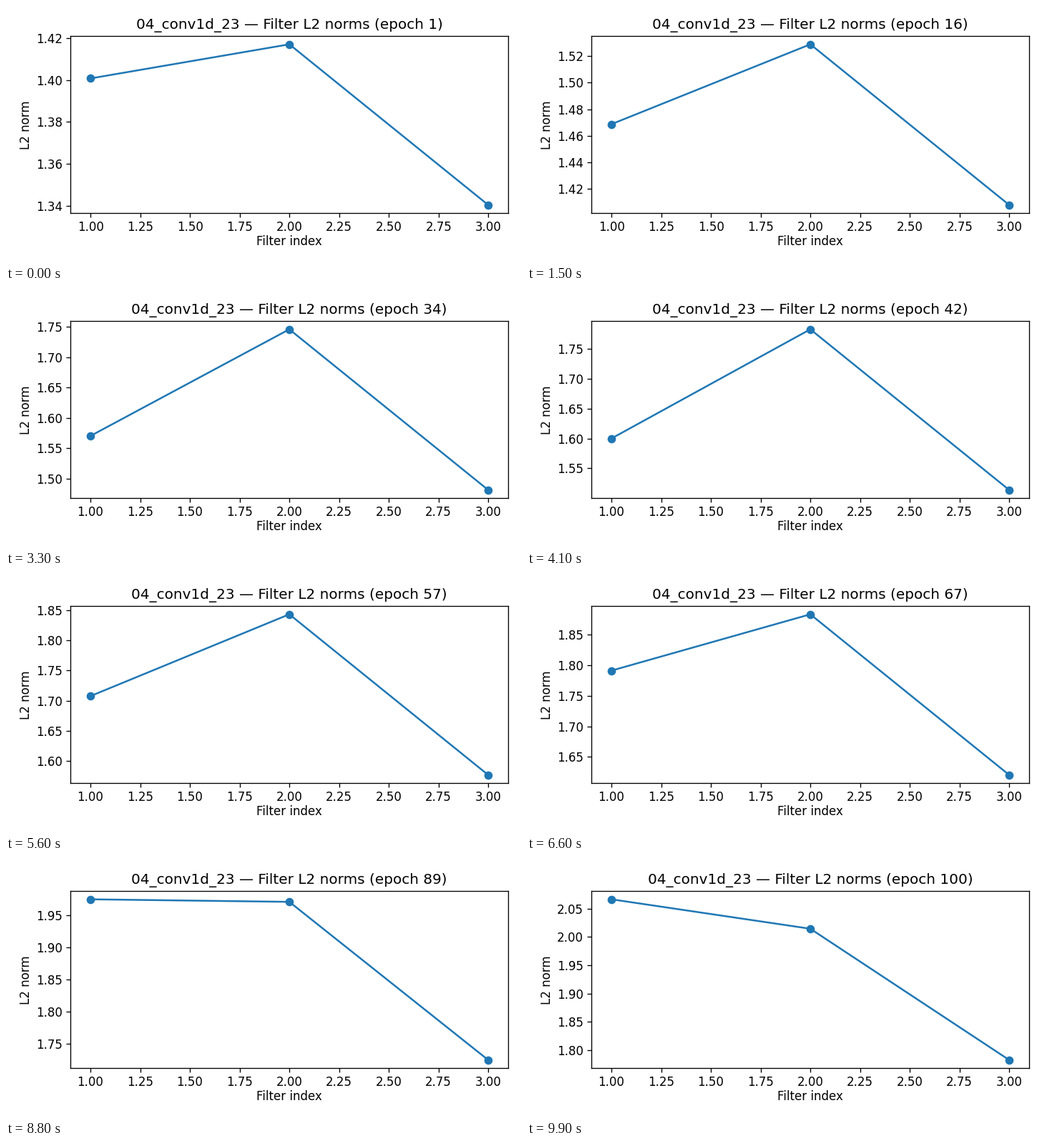
Recreate the animation shown at these times as a matplotlib script. Size 720x360 px, loop 10000 ms.

```python
import numpy as np
import matplotlib.pyplot as plt
from matplotlib.animation import FuncAnimation

W, H = 720, 360
EPOCHS = 100
FILTERS = [1, 2, 3]


def surge(s, center, steepness):
    """Logistic step from 0 to 1."""
    return 1 / (1 + np.exp(-steepness * (s - center)))


def norms_at(epoch):
    """Steady growth of each filter plus its own spurts."""
    s = (epoch - 1) / (EPOCHS - 1)
    late = max(0, s - 0.4525)
    first = 1.4008 + 0.37 * s + 0.046 * surge(s, 0.175, 45) + 0.456 * late
    second = 1.4155 + 0.394 * s + 0.205 * surge(s, 0.193, 25)
    third = (1.3403 + 0.398 * s + 0.0369 * s ** 4
             + 0.0076 * (1 - np.exp(-s / 0.05)))
    return [first, second, third]


plt.rcParams["font.family"] = "DejaVu Sans"
fig, ax = plt.subplots(figsize=(W / 120, H / 120), dpi=120)


def draw(frame):
    epoch = frame + 1
    ax.clear()
    # Start from the default margins so the layout never depends on history.
    fig.subplots_adjust(left=0.125, right=0.9, bottom=0.11, top=0.88)
    ax.plot(FILTERS, norms_at(epoch), marker="o", color="tab:blue")
    ax.set_title(f"04_conv1d_23 — Filter L2 norms (epoch {epoch})")
    ax.set_xlabel("Filter index", labelpad=1.6)
    ax.set_ylabel("L2 norm", labelpad=2.8)
    ax.tick_params(axis="x", pad=2.9)
    # The left margin follows the tick label width; the other sides are fixed.
    fig.tight_layout()
    fig.subplots_adjust(left=fig.subplotpars.left + 1 / W, right=702 / W,
                        top=1 - 42.4 / H, bottom=1 - 290 / H)
    return ax.lines


anim = FuncAnimation(fig, draw, frames=EPOCHS, init_func=lambda: draw(0),
                     interval=100, repeat=True, repeat_delay=0, blit=False)
plt.show()
```
